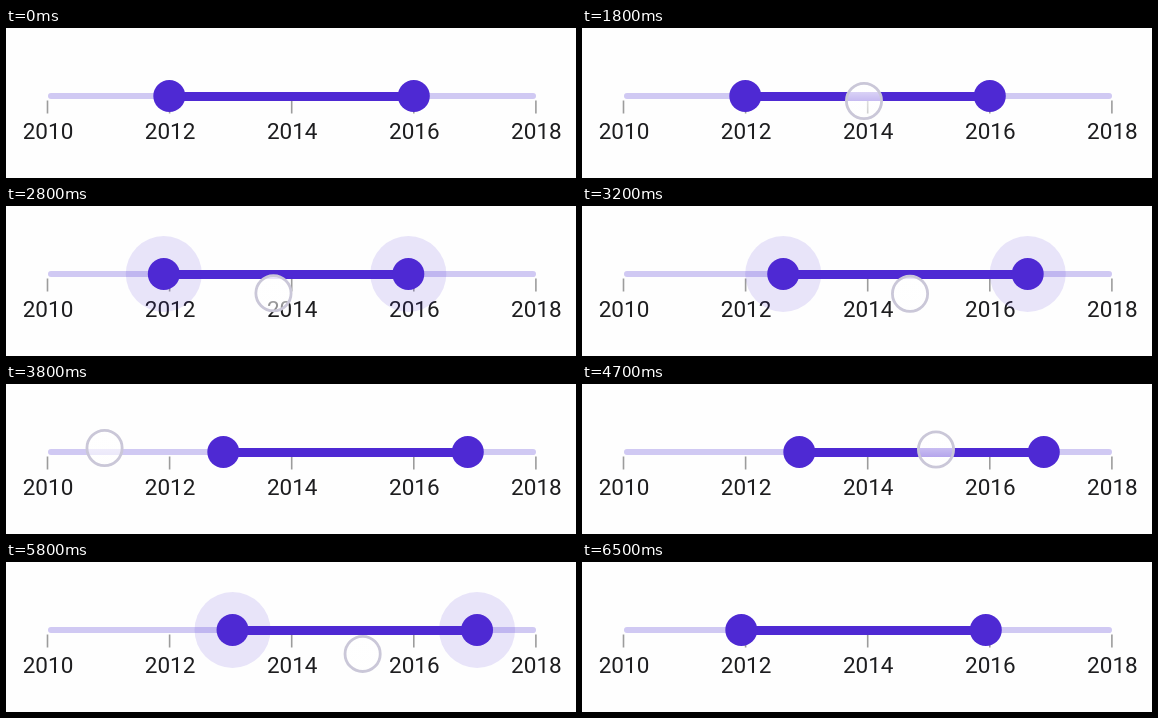
An HTML page that plays this animation: 570 px wide and 150 px high, repeating every 7.1 s.

```html
<!DOCTYPE html>
<html lang="en">
<head>
<meta charset="utf-8">
<title>Range slider</title>
<style>
  html, body { margin: 0; width: 100%; height: 100%; overflow: hidden; background: #fefefe; }
  svg { display: block; width: 570px; height: 150px; }
  text { font: 22.5px Roboto, sans-serif; fill: #1d1d1f; text-anchor: middle; }
  line { stroke-linecap: round; }
  .tick { stroke: #9c9c9c; stroke-width: 1.6; stroke-linecap: butt; }
  .halo, .thumb { fill: #4e29d3; }
  #track { stroke: #d0c9f3; stroke-width: 6; }
  #active { stroke: #4e29d3; stroke-width: 9; }
  #ring { fill: url(#glass); stroke: #cac7d8; stroke-width: 2.8; }
</style>
</head>
<body>
<svg viewBox="0 0 570 150">
  <linearGradient id="glass" x2="0" y2="1">
    <stop stop-color="#fff" stop-opacity=".9"/>
    <stop offset="1" stop-color="#fff" stop-opacity=".45"/>
  </linearGradient>
  <g id="scale"></g>
  <line id="track" x1="45" x2="527" y1="68" y2="68"/>
  <circle class="halo" cy="68"/>
  <circle class="halo" cy="68"/>
  <line id="active" y1="68.4" y2="68.4"/>
  <circle class="thumb" cy="68" r="16"/>
  <circle class="thumb" cy="68" r="16"/>
  <circle id="ring" r="17.6"/>
</svg>
<script>
const LOOP = 7100, STEP = 100, TICK_GAP = 122.1;
const $ = id => document.getElementById(id);
const halos = document.querySelectorAll('.halo');
const thumbs = document.querySelectorAll('.thumb');
const clamp = v => Math.max(0, Math.min(1, v));

// A finger lands at (x, y), sinks towards `sink` and swings between the stops.
const touches = [
  { from: 700, to: 1000, x: 465.5, y: 73, sink: 73, stops: [0, 0] },
  { from: 1800, to: 3600, x: 282, y: 73, sink: 88, stops: [0, 85, -17, 54], delay: 210, drags: true },
  { from: 3800, to: 4400, x: 92, y: 64, sink: 73, stops: [0, 92] },
  { from: 4700, to: 6500, x: 354, y: 65.5, sink: 93, stops: [54, -34, 65, -4], delay: 70, drags: true }
];

// Sine-eased swing through evenly timed stops.
function swing({ from, to, stops, delay = 0 }, t) {
  const start = from + delay, end = to - 260;
  const pos = clamp((t - start) / (end - start)) * (stops.length - 1);
  const i = Math.min(Math.floor(pos), stops.length - 2);
  return stops[i] + (stops[i + 1] - stops[i]) * (1 - Math.cos(Math.PI * (pos - i))) / 2;
}

function set(el, attrs) {
  for (const name in attrs) el.setAttribute(name, attrs[name]);
}

$('scale').innerHTML = [0, 1, 2, 3, 4].map(i => {
  const x = 41.5 + i * TICK_GAP;
  return `<line class="tick" x1="${x}" x2="${x}" y1="72.5" y2="85.5"/>
    <text x="${x + 0.5}" y="111">${2010 + 2 * i}</text>`;
}).join('');

function drawSlider(t) {
  const drag = touches.filter(g => g.drags && g.from <= t).pop();
  const shift = drag ? swing(drag, t) : 0;
  const press = drag ? clamp(Math.min(t - drag.from - 30, drag.to - 130 - t) / 150) : 0;
  const xs = [163.3, 407.8].map(x => x + shift);
  xs.forEach((cx, i) => {
    set(thumbs[i], { cx });
    set(halos[i], { cx, r: 16 + 22 * press, opacity: 0.12 * press });
  });
  set($('active'), { x1: xs[0], x2: xs[1] });
}

// The finger runs slightly ahead of the thumbs.
function drawFinger(t) {
  const g = touches.find(g => t >= g.from && t < g.to);
  set($('ring'), g ? {
    cx: g.x + 0.95 * (swing(g, t + 60) - g.stops[0]),
    cy: g.sink + (g.y - g.sink) * Math.exp((g.from - t) / 340),
    opacity: clamp((g.to - t) / 250)
  } : { opacity: 0 });
}

function frame() {
  const now = performance.now() % LOOP;
  const t = Math.floor(now / STEP) * STEP;
  drawSlider(t);
  drawFinger(t);
  requestAnimationFrame(frame);
}
frame();
</script>
</body>
</html>
```
